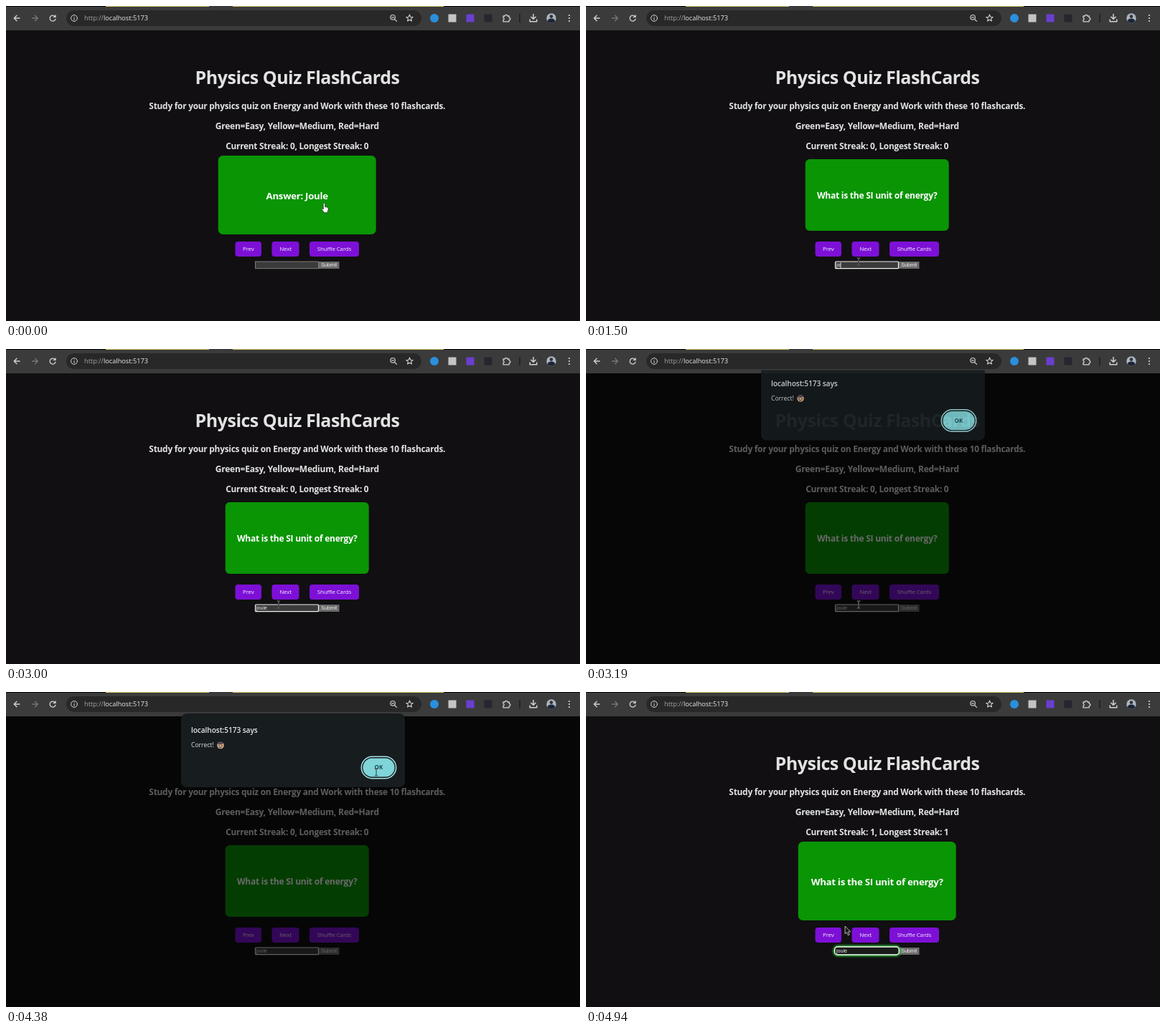
An HTML page that plays this animation: 800 by 440 pixels, repeating every 5 s.

```html
<!DOCTYPE html>
<html lang="en">
<head>
<meta charset="utf-8">
<title>Physics Quiz FlashCards</title>
<style>
  html, body { margin: 0; width: 100%; height: 100%; overflow: hidden; background: #110f12; }
  svg { display: block; width: 800px; height: 440px; }
  text { font-family: "Open Sans", "Noto Sans", sans-serif; white-space: pre; }
  .bold { font-weight: 700; letter-spacing: -.02em; text-anchor: middle; fill: #e2e2e2; }
  .btn rect { fill: #7d10d6; }
  .btn text { font-size: 8px; font-weight: 500; letter-spacing: -.02em; text-anchor: middle; fill: #f4ecfb; }
  .form text { font: 7.1px "Liberation Sans", Arial, sans-serif; fill: #f2f2f2; }
  .icon { fill: none; stroke: #d2d2d2; stroke-width: 1.3; stroke-linecap: round; stroke-linejoin: round; }
  #beam { fill: none; stroke: #999; stroke-width: 1; mix-blend-mode: difference; }
</style>
</head>
<body>
<svg viewBox="0 0 800 440">
  <defs>
    <clipPath id="below"><rect y="29.5" width="800" height="411"/></clipPath>
    <filter id="glow" x="-20%" y="-80%" width="140%" height="260%"><feGaussianBlur stdDeviation="1.8"/></filter>
  </defs>
  <rect width="800" height="440" fill="#110f12"/>

  <g id="page">
    <text class="bold" x="406" y="108.5" font-size="25">Physics Quiz FlashCards</text>
    <text class="bold" x="405.8" y="144" font-size="11.87">Study for your physics quiz on Energy and Work with these 10 flashcards.</text>
    <text class="bold" x="405.8" y="172" font-size="12.04">Green=Easy, Yellow=Medium, Red=Hard</text>
    <text class="bold" x="405.8" y="200" font-size="11.84" id="streak"></text>
    <g id="card">
      <rect x="-100" y="-50" width="200" height="100" rx="6" fill="#0a9505"/>
      <text class="bold" y="5" font-size="12" style="fill:#fff" id="face"></text>
    </g>
    <g class="btn">
      <rect x="319.5" y="329" width="36.5" height="21" rx="4"/>
      <rect x="370.5" y="329" width="38" height="21" rx="4" id="next"/>
      <rect x="423" y="329" width="69" height="21" rx="4"/>
      <text x="337.8" y="342.4">Prev</text>
      <text x="389.5" y="342.4">Next</text>
      <text x="457.5" y="342.4">Shuffle Cards</text>
    </g>
    <g class="form">
      <rect x="436" y="357" width="28.5" height="10" fill="#6b6b6b"/>
      <text x="439.2" y="364.4">Submit</text>
      <rect id="halo" x="346" y="355.5" width="91" height="12" rx="5" fill="none" stroke="#2fd03a" stroke-width="3" filter="url(#glow)"/>
      <rect id="field"/>
      <text x="349" y="364.2" id="typed"></text>
      <rect id="caret" y="358.2" width=".8" height="7.6" fill="#fff"/>
    </g>
  </g>
  <rect id="scrim" y="34" width="800" height="406" fill="#000"/>

  <g id="chrome">
    <rect width="800" height="34" fill="#3b3b3b"/>
    <rect width="800" height="1" fill="#050505"/>
    <path d="M139 0H283V1H139ZM316 0H610V1H316Z" fill="#d9c768"/>
    <rect x="283" width="33" height="1" fill="#3b3b3b"/>
    <rect x="84" y="6" width="495" height="22" rx="11" fill="#282828"/>
    <g class="icon">
      <path d="M19 17H11.5M15 13.2L11.2 17L15 20.8"/>
      <path d="M36.5 17H44M40.5 13.2L44.3 17L40.5 20.8" stroke="#777"/>
      <path d="M68.6 15A4 4 0 1 0 69 18.2M69 12.8V15.4H66.3"/>
      <circle cx="95" cy="17" r="4.4" stroke-width="1"/>
      <path d="M95 16.8V19.2M95 14.8V14.9" stroke-width="1.1"/>
      <path d="M541.5 18.5L544.6 21.4M537.6 15.8H540.6" stroke-width="1.2"/>
      <circle cx="539.1" cy="15.8" r="3.3" stroke-width="1.1"/>
      <path id="star" stroke-width="1.1"/>
      <path d="M693 14H695.4A1.7 1.7 0 0 1 698.8 14H701.2V16.2A1.7 1.7 0 0 1 701.2 19.6V21.8H693V19.4A1.6 1.6 0 0 0 693 16.3Z"/>
      <path d="M735 11.5V18M731.8 15.2L735 18.3L738.2 15.2M730.2 19V21.8H739.8V19" stroke-width="1.5"/>
    </g>
    <circle cx="597" cy="17" r="6" fill="#2a8fdc"/>
    <rect x="616.5" y="11.5" width="11" height="11" fill="#c4c4c4"/>
    <rect x="641.5" y="11.5" width="11" height="11" fill="#6a3fd0"/>
    <rect x="666.5" y="11.5" width="11" height="11" fill="#26262f"/>
    <rect x="715.5" y="11" width="1" height="12" fill="#111"/>
    <circle cx="760" cy="17" r="6.7" fill="#a9b6c4"/>
    <path d="M754.6 21A5.6 4.6 0 0 1 765.4 21A6.7 6.7 0 0 1 754.6 21Z" fill="#1c2438"/>
    <circle cx="760" cy="14.6" r="2.3" fill="#3a2f2c"/>
    <g fill="#d8d8d8"><circle cx="785" cy="13" r="1.1"/><circle cx="785" cy="17" r="1.1"/><circle cx="785" cy="21" r="1.1"/></g>
    <text x="109" y="20.3" font-size="9.2" fill="#a2a2a2">http://<tspan fill="#ececec">localhost:5173</tspan></text>
  </g>

  <g clip-path="url(#below)">
    <g id="dialog">
      <rect x="244" y="30" width="312" height="103" rx="8" fill="#171c1f"/>
      <text x="258" y="57" font-size="10.2" font-weight="600" letter-spacing="-.1" fill="#e4e8ea">localhost:5173 says</text>
      <text x="258" y="77.3" font-size="8.6" fill="#dfe4e6">Correct!</text>
      <circle cx="299" cy="74.5" r="4.8" fill="#d3ae8c"/>
      <path d="M294.4 73A4.8 4.8 0 0 1 303 72L300 73.4Z" fill="#5b4a58"/>
      <path d="M296 75H298M300 75H302M297 77.3H300.5" stroke="#3a2a28" stroke-width="1"/>
      <rect x="495.3" y="90.3" width="48.4" height="30.4" rx="15.2" fill="#171c1f" stroke="#a5e2e5" stroke-width="1.5"/>
      <rect x="497.4" y="92.4" width="44.2" height="26.2" rx="13.1" fill="#80d5d9"/>
      <text x="519.4" y="108.4" font-size="8" font-weight="700" text-anchor="middle" fill="#174c52">OK</text>
    </g>
  </g>

  <path id="hand" d="M-1.2 1A1.2 1.2 0 0 1 1.2 1V5.3L2.8 5.2L4.2 5.7L5.4 6.3C6 8.6 5.5 10 4.7 11.2V13.2H-.8V11.8L-3.7 8.3C-3.6 7.2-2.4 7.2-1.2 8.4Z" fill="#fff" stroke="#222" stroke-width=".7"/>
  <path id="arrow" d="M0 0V10.8L2.4 8.6L4.3 12.8L6.2 12L4.3 7.9H7.7Z" fill="#151515" stroke="#d8d8d8" stroke-width=".8"/>
  <path id="beam" d="M-2.2-5H-.6L0-4.4L.6-5H2.2M0-4.4V4.4M-2.2 5H-.6L0 4.4L.6 5H2.2"/>
</svg>
<script>
  const LOOP = 5000;
  const FLIP = 125, FOCUS = 1100, CLOSE = 4440, SCORED = 4500;
  const el = {};
  document.querySelectorAll('[id]').forEach(n => el[n.id] = n);

  // time, x, y of the pointer's hot spot
  const track = [
    [0, 443.5, 275.5], [180, 443.5, 275.5], [560, 384.5, 346.5], [750, 384.5, 346.5],
    [1060, 380, 357], [3750, 380, 357], [4250, 516, 112], [4450, 516, 112], [4930, 361, 327]
  ];
  // time, text in the field
  const typing = [[0, ''], [1440, 'j'], [1500, 'jo'], [1750, 'jou'], [1810, 'joul'], [2190, 'joule']];

  const ramp = (t, a, b) => Math.min(1, Math.max(0, (t - a) / (b - a)));
  const smooth = p => p * p * (3 - 2 * p);
  const easeOut = p => 1 - (1 - p) ** 2;
  const set = (node, attrs) => { for (const k in attrs) node.setAttribute(k, attrs[k]); };
  const show = (node, on) => node.setAttribute('visibility', on ? 'visible' : 'hidden');
  const write = (node, s) => { if (node.textContent !== s) node.textContent = s; };

  set(el.star, { d: 'M' + Array.from({ length: 10 }, (_, i) => {
    const r = i % 2 ? 2.2 : 5, a = i * Math.PI / 5;
    return (562.5 + r * Math.sin(a)).toFixed(2) + ' ' + (17 - r * Math.cos(a)).toFixed(2);
  }).join('L') + 'Z' });

  function pointer(t) {
    let i = track.length - 1;
    while (track[i][0] > t) i--;
    const a = track[i], b = track[i + 1] || a;
    const p = a === b ? 0 : smooth(ramp(t, a[0], b[0]));
    return [a[1] + (b[1] - a[1]) * p, a[2] + (b[2] - a[2]) * p];
  }

  function cursorKind(t, x, y) {
    if (t > 2000 && t < SCORED) return 'beam';
    if (y > 353 && t < 3000) return 'beam';
    const onCard = y > 209 && y < 319 && x > 296 && x < 516;
    const onNext = y > 329 && y < 350 && x > 370 && x < 409;
    return onCard || onNext ? 'hand' : 'arrow';
  }

  function drawField(t) {
    const focused = t >= FOCUS, scored = t >= SCORED;
    const text = typing.filter(k => k[0] <= t).pop()[1];
    write(el.typed, text);
    show(el.halo, scored);
    set(el.field, scored
      ? { x: 346.6, y: 356, width: 89.6, height: 11, rx: 4, fill: '#1a1a1a', stroke: '#f4fff4', 'stroke-width': 1.4 }
      : { x: 347.5, y: 357, width: 88, height: 9.7, rx: focused ? 1 : 0, fill: '#3b3b3b',
          stroke: focused ? '#f0f0f0' : '#858585', 'stroke-width': focused ? 1.2 : .9 });
    show(el.caret, focused && t < 2720);
    set(el.caret, { x: 349 + (text ? el.typed.getComputedTextLength() : 0) });
  }

  function render(t) {
    const [x, y] = pointer(t);
    const kind = cursorKind(t, x, y);
    for (const k of ['hand', 'arrow', 'beam']) {
      show(el[k], k === kind);
      set(el[k], { transform: `translate(${x} ${y})` });
    }

    const hover = 1 - smooth(ramp(t, 350, 560)) + smooth(ramp(t, 4650, 4870));
    set(el.card, { transform: `translate(405.7 264) scale(${1 + .1 * hover})` });
    write(el.face, t < FLIP ? 'Answer: Joule' : 'What is the SI unit of energy?');
    const n = t < SCORED ? 0 : 1;
    write(el.streak, `Current Streak: ${n}, Longest Streak: ${n}`);
    set(el.next, { stroke: kind === 'hand' && y > 329 ? '#4b12a0' : 'none' });
    drawField(t);

    const open = ramp(t, 3050, 3310), away = 1 - ramp(t, CLOSE, CLOSE + 140);
    set(el.scrim, { opacity: .59 * Math.min(1, open * 2) * away });
    set(el.dialog, {
      opacity: Math.min(1, open * 1.6) * away,
      transform: `translate(0 ${-26 * (1 - easeOut(open))})`
    });
  }

  const start = performance.now();
  function tick() {
    render((performance.now() - start) % LOOP);
    requestAnimationFrame(tick);
  }
  tick();
</script>
</body>
</html>
```
